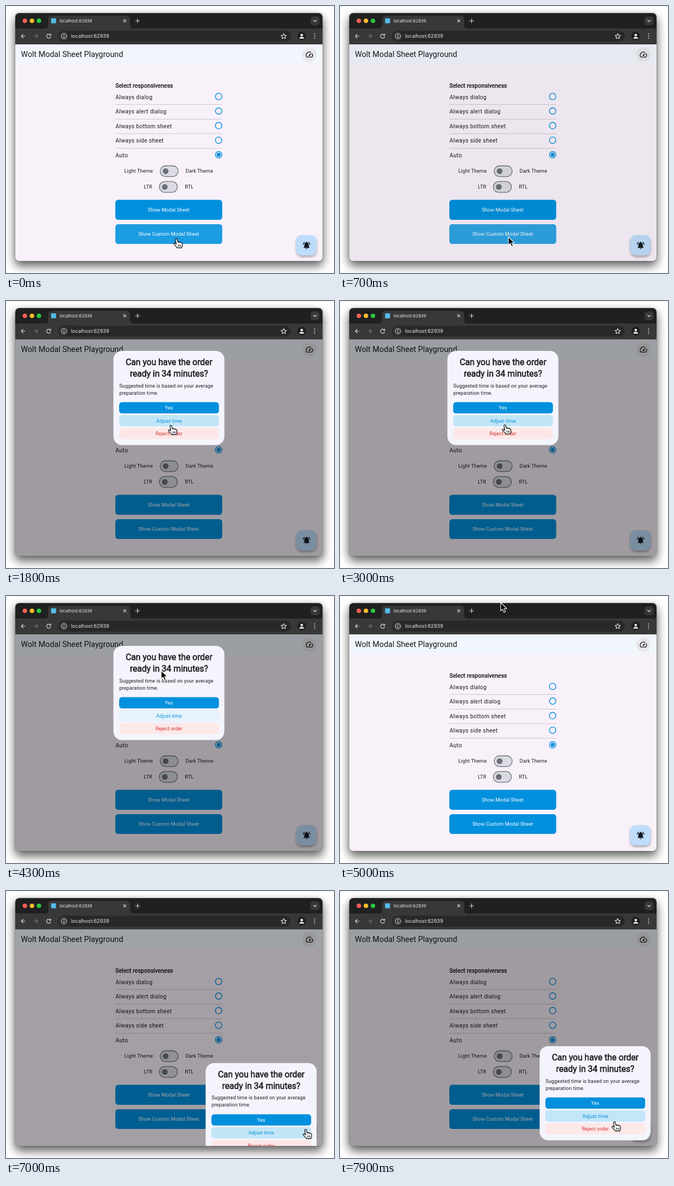
An HTML page that plays this animation: 600 px wide and 487 px high, repeating every 8 s.

```html
<!DOCTYPE html>
<html lang="en">
<head>
<meta charset="utf-8">
<title>Modal sheet playground</title>
<style>
  html, body { margin: 0; width: 100%; height: 100%; overflow: hidden; background: #fff; }
  svg { display: block; width: 100%; height: 100%; }
  text { font-family: Roboto, Arial, sans-serif; fill: #1b1b1f; }
  .ui { font-family: Inter, Roboto, sans-serif; fill: #e6e6e6; }
  .title { font-size: 14.3px; }
  .option { font-size: 10.4px; letter-spacing: .325px; }
  .heading { font-size: 10.4px; letter-spacing: .1px; stroke: #1b1b1f; stroke-width: .4px; }
  .small { font-size: 9.1px; letter-spacing: .163px; }
  .label { font-size: 9.1px; letter-spacing: .065px; text-anchor: middle; }
  .question { font-size: 15.6px; text-anchor: middle; stroke: #1b1b1f; stroke-width: .55px; }
  .line { fill: none; stroke: #d8d8d8; stroke-width: 1.2; stroke-linecap: round; stroke-linejoin: round; }
  #window { filter: drop-shadow(0 8px 9px rgba(0,0,0,.52)) drop-shadow(0 0 1px rgba(0,0,0,.45)); }
</style>
</head>
<body>
<svg viewBox="0 0 600 487" preserveAspectRatio="none">
  <defs>
    <clipPath id="frame"><rect x="17" y="13" width="562" height="452" rx="7"/></clipPath>
    <clipPath id="view"><path d="M17 70H579V458a7 7 0 0 1-7 7H24a7 7 0 0 1-7-7Z"/></clipPath>
    <clipPath id="buttonClip"><rect x="200" y="398" width="195.500" height="36" rx="5.200"/></clipPath>
    <clipPath id="fabClip"><rect x="531" y="418" width="37" height="37" rx="10"/></clipPath>
    <filter id="fabShadow" x="-40%" y="-40%" width="180%" height="180%">
      <feDropShadow dx="0" dy="2.500" stdDeviation="2.200" flood-opacity=".35"/>
    </filter>
  </defs>

  <rect width="600" height="1" fill="#ececec"/>
  <rect id="window" x="17" y="13" width="562" height="452" rx="7" fill="#f9f1fa"/>

  <!-- browser bar -->
  <g clip-path="url(#frame)">
    <rect x="17" y="13" width="562" height="29" fill="#1f2020"/>
    <rect x="17" y="41" width="562" height="29" fill="#383838"/>
    <path d="M71 41q6 0 6-6V24q0-6 6-6H221q6 0 6 6V35q0 6 6 6Z" fill="#383838"/>
    <rect x="95" y="45" width="426" height="20" rx="10" fill="#282828"/>
  </g>
  <circle cx="34.500" cy="27" r="4.100" fill="#ff5f57"/>
  <circle cx="47.500" cy="27" r="4.100" fill="#febc2e"/>
  <circle cx="60.300" cy="27" r="4.100" fill="#28c840"/>
  <rect x="82.500" y="22.500" width="9" height="9" fill="#55bdec"/>
  <text class="ui" x="98" y="29.900" font-size="7.800">localhost:62939</text>
  <text class="ui" x="119" y="58.300" font-size="9.100">localhost:62939</text>
  <path class="line" d="M215 24.800l4.400 4.400m0-4.400l-4.400 4.400M237 27h7.400m-3.700-3.700v7.400"/>
  <rect x="557" y="19" width="16.500" height="16" rx="5" fill="#383838"/>
  <path class="line" d="M562.700 26l2.600 2.500 2.600-2.500"/>
  <path class="line" d="M35 55H28m3.300-3.400L28 55l3.300 3.400"/>
  <path class="line" d="M51 55h7m-3.300-3.400L58 55l-3.300 3.400" style="stroke:#777"/>
  <path class="line" d="M81.200 53.200a3.700 3.700 0 1 0 .4 2.800M81.700 51v2.500h-2.500"/>
  <circle cx="106" cy="55" r="8" fill="#3a3a3a"/>
  <circle class="line" cx="106" cy="55" r="4.600" style="stroke-width:1"/>
  <path class="line" d="M106 54.800v2.400M106 52.700v.1"/>
  <path class="line" d="M508 50.200l1.400 3.100 3.400.4-2.500 2.300.7 3.400-3-1.700-3 1.700.7-3.400-2.500-2.300 3.400-.4Z"/>
  <circle cx="541" cy="55" r="8" fill="#202020"/>
  <circle cx="541" cy="53" r="2.300" fill="#f2f2f2"/>
  <path d="M536.700 59.500v-1q1-2.300 4.300-2.300t4.300 2.300v1Z" fill="#f2f2f2"/>
  <g fill="#dcdcdc">
    <circle cx="564.500" cy="51" r="1"/><circle cx="564.500" cy="55" r="1"/><circle cx="564.500" cy="59" r="1"/>
  </g>

  <!-- page -->
  <g clip-path="url(#view)">
    <rect x="17" y="70" width="562" height="37" fill="#f1f5fc"/>
    <text class="title" x="27.200" y="93.200">Wolt Modal Sheet Playground</text>
    <circle cx="555" cy="88.500" r="13" fill="#e8e7ea"/>
    <path transform="translate(547.200 80.700) scale(.65)" fill="#16181c" d="M20.380 8.570l-1.230 1.850a8 8 0 0 1-.22 7.580H5.070A8 8 0 0 1 15.580 6.850l1.850-1.230A10 10 0 0 0 3.350 19a2 2 0 0 0 1.720 1h13.850a2 2 0 0 0 1.740-1 10 10 0 0 0-.27-10.440zm-9.790 6.840a2 2 0 0 0 2.830 0l5.660-8.490-8.490 5.660a2 2 0 0 0 0 2.830z"/>
    <text class="heading" x="200.200" y="148.700">Select responsiveness</text>
    <g id="options"></g>
    <text class="small" x="216.500" y="304.400">Light Theme</text>
    <text class="small" x="328.500" y="304.400">Dark Theme</text>
    <text class="small" x="252.300" y="333.200">LTR</text>
    <text class="small" x="327.300" y="333.200">RTL</text>
    <g id="switches"></g>
    <rect x="200" y="353.500" width="195.500" height="36.500" rx="5.200" fill="#0090dd"/>
    <rect x="200" y="398" width="195.500" height="36" rx="5.200" fill="#0090dd"/>
    <g clip-path="url(#buttonClip)">
      <rect id="buttonHover" x="200" y="398" width="195.500" height="36" fill="#fff"/>
      <circle id="buttonRipple" cx="308" cy="421" fill="#fff"/>
    </g>
    <text class="label" x="297.700" y="375" style="fill:#fff">Show Modal Sheet</text>
    <text class="label" x="297.700" y="419.300" style="fill:#fff">Show Custom Modal Sheet</text>
    <rect x="531" y="418" width="37" height="37" rx="10" fill="#bedcfb" filter="url(#fabShadow)"/>
    <g clip-path="url(#fabClip)" fill="#0e2a40">
      <rect id="fabHover" x="531" y="418" width="37" height="37"/>
      <circle id="fabRipple" cx="545" cy="432"/>
    </g>
    <path transform="translate(541.700 428.300) scale(.68)" fill="#10171e" d="M7.580 4.080L6.150 2.650C3.750 4.480 2.170 7.300 2.030 10.500h2c.15-2.650 1.510-4.970 3.550-6.420zm12.390 6.420h2c-.15-3.200-1.730-6.020-4.120-7.850l-1.420 1.430c2.020 1.450 3.390 3.770 3.540 6.420zM18 11c0-3.070-1.640-5.640-4.500-6.320V4a1.500 1.500 0 0 0-3 0v.68C7.630 5.360 6 7.920 6 11v5l-2 2v1h16v-1l-2-2v-5zm-6 11a2 2 0 0 0 2-2h-4a2 2 0 0 0 2 2z"/>
    <rect id="dim" x="17" y="70" width="562" height="395" fill="#000"/>

    <g id="sheet">
      <rect width="203" height="171.700" rx="15.600" fill="#f4f4fd"/>
      <text class="question" x="101.700" y="26">Can you have the order</text>
      <text class="question" x="101.700" y="46.800">ready in 34 minutes?</text>
      <text class="small" x="10.700" y="66.700">Suggested time is based on your average</text>
      <text class="small" x="10.700" y="79.700">preparation time.</text>
      <g id="actions"></g>
    </g>
  </g>

  <path id="arrow" d="M0 0V15.200L3.500 12 6 17.700 8.600 16.500 6.100 11H11Z" fill="#000" stroke="#fff" stroke-width="1.100" stroke-linejoin="round"/>
  <g id="hand" stroke="#000" stroke-linecap="round" stroke-linejoin="round">
    <path fill="#fff" stroke-width="1.200" d="M-1.700 1.400C-1.800-.6 1-.9 1.400 1L2.600 6.200C3.600 5 5 5.200 5.400 6.600 6.300 5.400 7.800 5.800 8.200 7.200 9.200 6.400 10.400 7 10.600 8.400L11 12C11 14 9.600 15 9.600 16.500H1.600C.8 14.500-2.600 12.400-4.400 9.800-5.200 8.200-3.400 7.200-2.200 8.200L-.4 10Z"/>
    <path fill="none" stroke-width=".9" d="M3.400 11v3M5.600 11v3M7.800 11v3"/>
  </g>
</svg>

<script>
const LOOP = 8000, STEP = 100;
const $ = id => document.getElementById(id);

const clamp = v => Math.min(1, Math.max(0, v));
const span = (t, from, to) => clamp((t - from) / (to - from));
const smooth = p => p * p * (3 - 2 * p);
const easeOut = p => 1 - (1 - p) ** 3;

function add(parent, tag, attrs, text) {
  const node = document.createElementNS("http://www.w3.org/2000/svg", tag);
  for (const key in attrs) node.setAttribute(key, attrs[key]);
  if (text) node.textContent = text;
  return parent.appendChild(node);
}

function set(node, attrs) {
  for (const key in attrs) node.setAttribute(key, attrs[key]);
}

// Static rows and switches
["dialog", "alert dialog", "bottom sheet", "side sheet", ""].forEach((name, i) => {
  const y = 165 + i * 26.6, box = $("options");
  add(box, "text", { class: "option", x: 200.2, y: y + 4.6 }, name ? "Always " + name : "Auto");
  add(box, "circle", { cx: 389, cy: y, r: 5.9, fill: "none", stroke: "#008ddb", "stroke-width": 1.4 });
  if (name) add(box, "rect", { x: 200, y: y + 14.3, width: 195.5, height: .8, fill: "#c2bac4" });
  else add(box, "circle", { cx: 389, cy: y, r: 3.7, fill: "#008ddb" });
});

[[282, 301.3], [280.5, 330]].forEach(([x, y]) => {
  add($("switches"), "rect", { x, y: y - 9.8, width: 33, height: 19.6, rx: 9.8, fill: "#dbdce3", stroke: "#6c7076", "stroke-width": 1.3 });
  add($("switches"), "circle", { cx: x + 10, cy: y, r: 5.3, fill: "#6c7076" });
});

// Sheet actions: label, text, fill, hovered fill
const actions = [
  ["Yes", "#fff", "#0090dd", "#1c9bdf"],
  ["Adjust time", "#0a93da", "#e4f3fc", "#c2e6f8"],
  ["Reject order", "#d62f2f", "#fde8e8", "#fad3d3"]
].map(([label, color, fill, hover], i) => {
  const y = 93.5 + i * 23.5;
  const rect = add($("actions"), "rect", { x: 10.5, y, width: 182.5, height: 20.6, rx: 5.2, fill });
  add($("actions"), "text", { class: "label", x: 101.7, y: y + 13.6, style: "fill:" + color }, label);
  return { rect, y, fill, hover };
});

// Pointer track: time, x, y
const track = [
  [0, 308, 421], [1000, 308, 421], [1600, 298, 226], [1800, 298, 223.5],
  [3500, 298, 222], [4100, 284, 136], [4500, 284, 136], [4800, 292, 38],
  [5000, 294, 12], [5300, 294, 12], [6200, 544.5, 431.5], [7250, 544.5, 431.5], [7800, 498.5, 417.5]
];

function pointer(t) {
  const i = track.findIndex(k => k[0] > t);
  if (i < 0) return track[track.length - 1].slice(1);
  const [a, b] = [track[i - 1], track[i]];
  const p = smooth(span(t, a[0], b[0]));
  return [a[1] + (b[1] - a[1]) * p, a[2] + (b[2] - a[2]) * p];
}

function sheetPlace(t) {
  if (t < 6000) {
    const shown = easeOut(span(t, 725, 1105));
    const leave = smooth(span(t, 4500, 4900));
    return [196.5, 91 - 192.5 * (1 - shown + leave)];
  }
  return [365.2, 283 + 182 * (1 - easeOut(span(t, 6830, 7210)))];
}

const inside = (x, y, left, top, w, h) => x >= left && x <= left + w && y >= top && y <= top + h;

function ripple(node, t, start, radius, alpha) {
  const grow = span(t, start, start + 350);
  const fade = 1 - span(t, start + 250, start + 650);
  set(node, { r: radius * easeOut(grow), opacity: grow ? alpha * fade : 0 });
}

function draw(t) {
  const [x, y] = pointer(t);
  const [sx, sy] = sheetPlace(t);
  const dim = smooth(span(t, 640, 900)) - smooth(span(t, 4600, 4950)) + smooth(span(t, 6770, 7030));
  const open = dim > .1;

  set($("dim"), { opacity: .355 * dim });
  set($("sheet"), { transform: `translate(${sx} ${sy})` });

  let over = false;
  for (const a of actions) {
    const hit = open && inside(x, y, sx + 10.5, sy + a.y, 182.5, 20.6);
    a.rect.setAttribute("fill", hit ? a.hover : a.fill);
    over = over || hit;
  }

  const onButton = !open && inside(x, y, 200, 398, 195.5, 36);
  const onFab = !open && inside(x, y, 531, 418, 37, 37);
  set($("buttonHover"), { opacity: t < 2000 ? .11 * (1 - span(t, 750, 1150)) : 0 });
  set($("fabHover"), { opacity: onFab ? .09 : 0 });
  ripple($("buttonRipple"), t, 480, 130, .08);
  ripple($("fabRipple"), t, 6610, 30, .12);

  const hand = over || onButton || onFab;
  set($("hand"), { transform: `translate(${x + 3.7} ${y + 3.7})`, visibility: hand ? "visible" : "hidden" });
  set($("arrow"), { transform: `translate(${x} ${y})`, visibility: hand ? "hidden" : "visible" });
}

const begin = performance.now();
function tick() {
  const t = (performance.now() - begin) % LOOP;
  draw(Math.floor(t / STEP) * STEP);
  requestAnimationFrame(tick);
}
tick();
</script>
</body>
</html>
```
